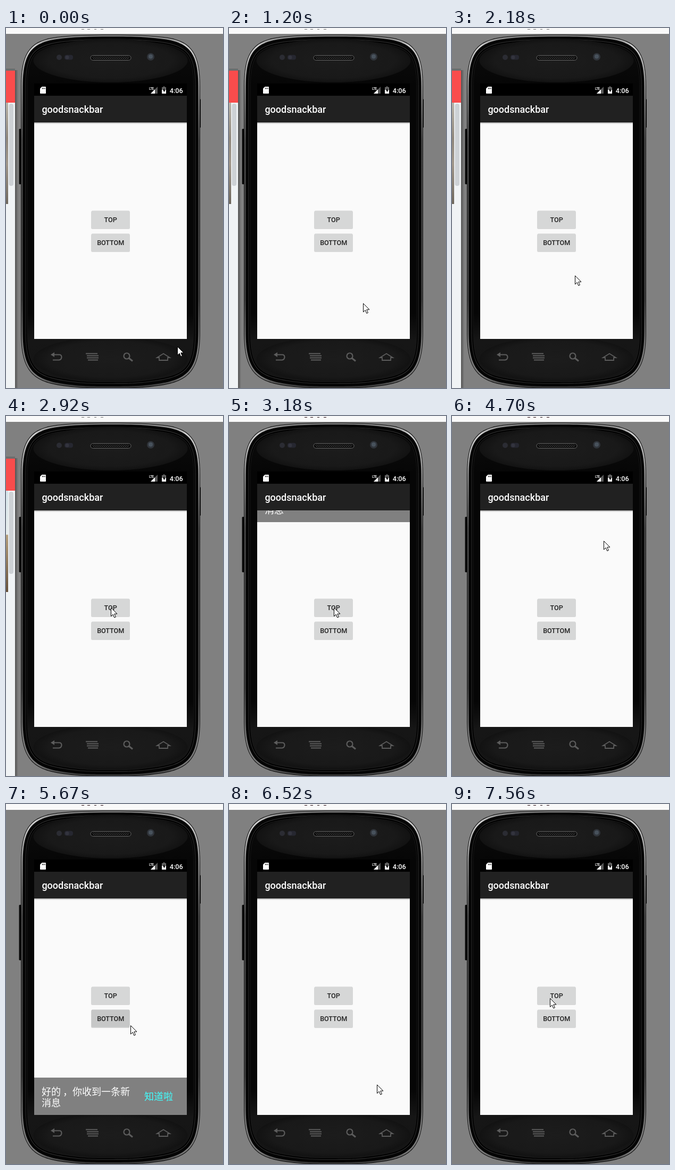
Recreate the animation shown at these times as an HTML page. Size 408 by 675 pixels, loop 8000 ms.

```html
<!DOCTYPE html>
<html lang="en">
<head>
<meta charset="utf-8">
<title>Snackbar demo</title>
<style>
html, body { margin: 0; width: 100%; height: 100%; overflow: hidden; background: #808080; }
svg { display: block; width: 100%; height: 100%; }
text { font-family: Roboto, sans-serif; font-weight: 500; }
.cjk text { font-family: "Noto Sans CJK SC", "Noto Sans CJK", sans-serif; font-weight: 400; font-size: 18px; fill: #fff; }
.cjk .action { fill: #40ffff; }
</style>
</head>
<body>
<svg viewBox="0 0 408 675" xmlns="http://www.w3.org/2000/svg">
  <defs>
    <linearGradient id="rim" x1="0" y1="0" x2="0" y2="1">
      <stop offset="0" stop-color="#777"/><stop offset=".03" stop-color="#d0d0d0"/>
      <stop offset=".13" stop-color="#9a9a9a"/><stop offset=".3" stop-color="#4c4c4c"/>
      <stop offset=".75" stop-color="#444"/><stop offset=".9" stop-color="#808080"/>
      <stop offset=".97" stop-color="#777"/><stop offset="1" stop-color="#333"/>
    </linearGradient>
    <linearGradient id="face" x1="0" y1="0" x2="0" y2="1">
      <stop offset="0" stop-color="#0c0c0c"/><stop offset=".13" stop-color="#060606"/>
      <stop offset=".8" stop-color="#060606"/><stop offset=".88" stop-color="#161616"/>
      <stop offset="1" stop-color="#141414"/>
    </linearGradient>
    <radialGradient id="gloss">
      <stop offset="0" stop-color="#1c1c1c"/><stop offset=".8" stop-color="#191919"/>
      <stop offset="1" stop-color="#121212"/>
    </radialGradient>
    <linearGradient id="fade" x1="0" y1="0" x2="0" y2="1">
      <stop offset="0" stop-opacity=".35"/><stop offset="1" stop-opacity="0"/>
    </linearGradient>
    <linearGradient id="side">
      <stop offset="0" stop-opacity=".35"/><stop offset="1" stop-opacity="0"/>
    </linearGradient>
    <linearGradient id="photoA" x1="0" y1="0" x2="0" y2="1">
      <stop offset="0" stop-color="#b9b3a8"/><stop offset=".35" stop-color="#8f877c"/>
      <stop offset=".6" stop-color="#a0968a"/><stop offset="1" stop-color="#6e675d"/>
    </linearGradient>
    <linearGradient id="photoB" x1="0" y1="0" x2="0" y2="1">
      <stop offset="0" stop-color="#d5e4ea"/><stop offset=".43" stop-color="#e6ecec"/>
      <stop offset=".44" stop-color="#b59f7c"/><stop offset="1" stop-color="#66503a"/>
    </linearGradient>
    <pattern id="mesh" width="4" height="4" patternUnits="userSpaceOnUse">
      <circle cx="1" cy="1" r=".8" fill="#666"/><circle cx="3" cy="3" r=".8" fill="#4c4c4c"/>
    </pattern>
    <clipPath id="content"><rect x="53" y="177" width="287" height="406"/></clipPath>
  </defs>

  <rect width="408" height="675" fill="#808080"/>
  <rect width="408" height="11" fill="#f9f9f9"/>
  <path id="ticks" d="M142 2.500h5M153 2.500h5M166 2.500h4M178 2.500h5"/>

  <g id="page">
    <rect y="76" width="17" height="4" fill="#000" opacity=".15"/>
    <rect x="17" y="79" width="6" height="596" fill="url(#side)"/>
    <rect y="80" width="17" height="595" fill="#f0f3f5"/>
    <rect y="80" width="17" height="60" fill="#f94c4c"/>
    <rect id="photo" y="140" width="4" height="190"/>
    <rect x="5.500" y="142" width="8.500" height="154" rx="4" fill="#cdd1d5"/>
  </g>

  <rect x="24.500" y="189" width="6" height="104" rx="1.500" fill="#080808"/>
  <rect x="362" y="133" width="4" height="54" rx="1.500" fill="#080808"/>
  <g id="body"></g>

  <ellipse cx="196.500" cy="61" rx="145" ry="41" fill="url(#gloss)"/>
  <ellipse cx="196.500" cy="621" rx="145" ry="42" fill="url(#gloss)"/>
  <rect x="159" y="51.500" width="76" height="9" rx="4.500" fill="#0b0b0b" stroke="#666"/>
  <rect x="162" y="53" width="70" height="6" rx="3" fill="url(#mesh)"/>
  <circle cx="100" cy="55" r="5" fill="#2b2c33"/>
  <rect x="110" y="50.500" width="16" height="9" rx="4" fill="#262730"/>
  <circle cx="115" cy="55" r="3.500" fill="#33343e"/>
  <circle cx="272" cy="54" r="7" fill="#30343a"/>
  <circle cx="272" cy="53.500" r="4" fill="#48525c"/>

  <g fill="none" stroke="#5c5c5c" stroke-width="2.200">
    <path d="M88 612.500h12q4.500 0 4.500 4.500t-4.500 5.500h-12"/>
    <path d="M84 612.500l7-4.500v9z" fill="#5c5c5c" stroke="none"/>
    <path d="M150 610.500h22M152 614.500h22M152 618.500h22M154 622.500h19" stroke-width="1.900"/>
    <circle cx="227" cy="615" r="5.500"/>
    <path d="M231 619l7 5.500" stroke-width="3"/>
    <path d="M284 618l12-7.500 12 7.500h-4v5h-16v-5z" stroke-width="1.800"/>
  </g>

  <rect x="53" y="104" width="287" height="479" fill="#000"/>
  <rect x="53" y="127" width="287" height="50" fill="#212121"/>
  <rect x="53" y="177" width="287" height="406" fill="#fafafa"/>
  <g fill="#fff">
    <path d="M67.500 110h6.500q1 0 1 1v11q0 1-1 1h-9q-1 0-1-1v-8.500z"/>
    <path d="M68.500 112v2.500M70.700 112v2.500M73 112v2.500" stroke="#000"/>
    <path d="M285 110v13h-13z" opacity=".35"/>
    <path d="M280 115v8h-8z"/>
    <text x="269" y="115.500" font-size="6.500" font-weight="700" letter-spacing="-.6">LTE</text>
    <path d="M295.500 109.500h3v1.500h2.500v5h-8v-5h2.500z" opacity=".4"/>
    <path d="M293 116h8v7h-8z"/>
    <path d="M297.800 112.500l-3 5h2v3.500l3-5h-2z" fill="#000"/>
    <text x="307.800" y="121.500" font-size="12.600">4:06</text>
    <text x="67.400" y="159" font-size="18">goodsnackbar</text>
  </g>
  <rect x="53" y="177" width="287" height="3" fill="url(#fade)"/>

  <g id="buttons" font-size="12.600" text-anchor="middle"></g>
  <g clip-path="url(#content)">
    <g id="bar" class="cjk">
      <rect x="53" width="287" height="70" fill="#808080"/>
      <text x="67" y="33">好的 ，你收到一条新</text>
      <text x="67" y="54">消息</text>
      <text x="260" y="42" class="action">知道啦</text>
      <rect id="barShade" x="53" width="287" height="3" fill="url(#fade)"/>
    </g>
  </g>
  <path id="cursor" d="M.5-.5v16l3.700-3.500 2.600 6 2.600-1.100-2.600-5.900h5.200z" fill="#fff" stroke="#000"/>
</svg>
<script>
const LOOP = 8000;
const $ = id => document.getElementById(id);

// Phone outline, shrunk by i pixels on every side.
function outline(i) {
  const c = 196.5, l = 28 + i, r = 365 - i, t = 12.5 + i, b = 675.5 - i;
  return `M${l} 110C${l} 50 ${l + 15} ${t + 13} ${l + 60} ${t + 5.5}
    C${l + 95} ${t + .5} ${c - 40} ${t} ${c} ${t}
    C${c + 40} ${t} ${r - 95} ${t + .5} ${r - 60} ${t + 5.5}
    C${r - 15} ${t + 13} ${r} 50 ${r} 110V570
    C${r} 640 ${r - 20} ${b - 13} ${r - 75} ${b - 5}
    C${r - 110} ${b} ${c + 40} ${b} ${c} ${b}
    C${c - 40} ${b} ${l + 110} ${b} ${l + 75} ${b - 5}
    C${l + 20} ${b - 13} ${l} 640 ${l} 570Z`;
}

$("body").innerHTML = [[0, "#111"], [1, "url(#rim)"], [3.5, "#050505"], [8.5, "#2e2e2e"],
  [9.6, "#000"], [11.5, "#181818"], [12.5, "url(#face)"]]
  .map(([i, fill]) => `<path d="${outline(i)}" fill="${fill}"/>`).join("");

const button = (id, y, label) => `
  <rect x="160" y="${y + 1}" width="73" height="33.500" rx="2.500" fill="#000" opacity=".14"/>
  <rect id="${id}" x="160.500" y="${y}" width="72" height="33" rx="2"/>
  <text x="196.700" y="${y + 21.5}" fill="#212121">${label}</text>`;
$("buttons").innerHTML = button("top", 342.5, "TOP") + button("bottom", 385.5, "BOTTOM");

// Pointer moves: first step, last step, step count, then a quadratic curve.
const moves = [
  [0, 0, 1, 322, 598, 322, 598, 322, 598],
  [160, 740, 5, 333, 620, 215, 425, 250, 521],
  [1200, 1720, 5, 252, 517, 245, 498, 236, 478],
  [2180, 2920, 6, 231, 465, 200, 395, 197, 360],
  [4030, 4420, 4, 210, 330, 260, 235, 285, 211],
  [4700, 5100, 4, 285, 235, 250, 350, 200, 408],
  [5670, 6380, 6, 234, 416, 284, 515, 286, 545],
  [6520, 7160, 6, 278, 527, 205, 385, 184, 368],
  [7560, 7560, 1, 184, 365, 184, 365, 184, 365]
];

function pointer(t) {
  const [a, b, n, x0, y0, x1, y1, x2, y2] = moves.filter(m => m[0] <= t).pop();
  const last = n - 1;
  const u = last ? Math.min(last, Math.floor((t - a) / (b - a) * last + .02)) / last : 0;
  const curve = (p, q, r) => Math.round((1 - u) ** 2 * p + 2 * u * (1 - u) * q + u * u * r);
  return [curve(x0, x1, x2), curve(y0, y1, y2)];
}

const within = (t, a, b) => t >= a && t < b;

// The bar arrives in three hard steps and leaves at once.
const shown = (t, a, b, c) => t < a ? 0 : t < b ? .3 : t < c ? .88 : 1;

function draw(t) {
  const [x, y] = pointer(t);
  $("cursor").setAttribute("transform", `translate(${x} ${y})`);

  $("page").style.display = t < 3060 ? "" : "none";
  $("photo").setAttribute("fill", t < 2470 ? "url(#photoA)" : "url(#photoB)");
  $("ticks").setAttribute("stroke", t < 3060 ? "#777" : "#2a0c14");

  $("top").setAttribute("fill", within(t, 3060, 3180) ? "#c6c7c7" : "#d6d7d7");
  $("bottom").setAttribute("fill", within(t, 5370, 5790) ? "#c6c7c7" : "#d6d7d7");

  const above = within(t, 3180, 4700), below = within(t, 5370, 6520);
  $("bar").style.display = above || below ? "" : "none";
  $("barShade").style.display = above ? "" : "none";
  const barY = above ? 178 - 70 * (1 - shown(t, 3180, 3310, 3460))
                     : 583 - 70 * shown(t, 5370, 5520, 5670);
  $("bar").setAttribute("transform", `translate(0 ${barY})`);
}

function tick() {
  draw(performance.now() % LOOP);
  requestAnimationFrame(tick);
}
tick();
</script>
</body>
</html>
```
